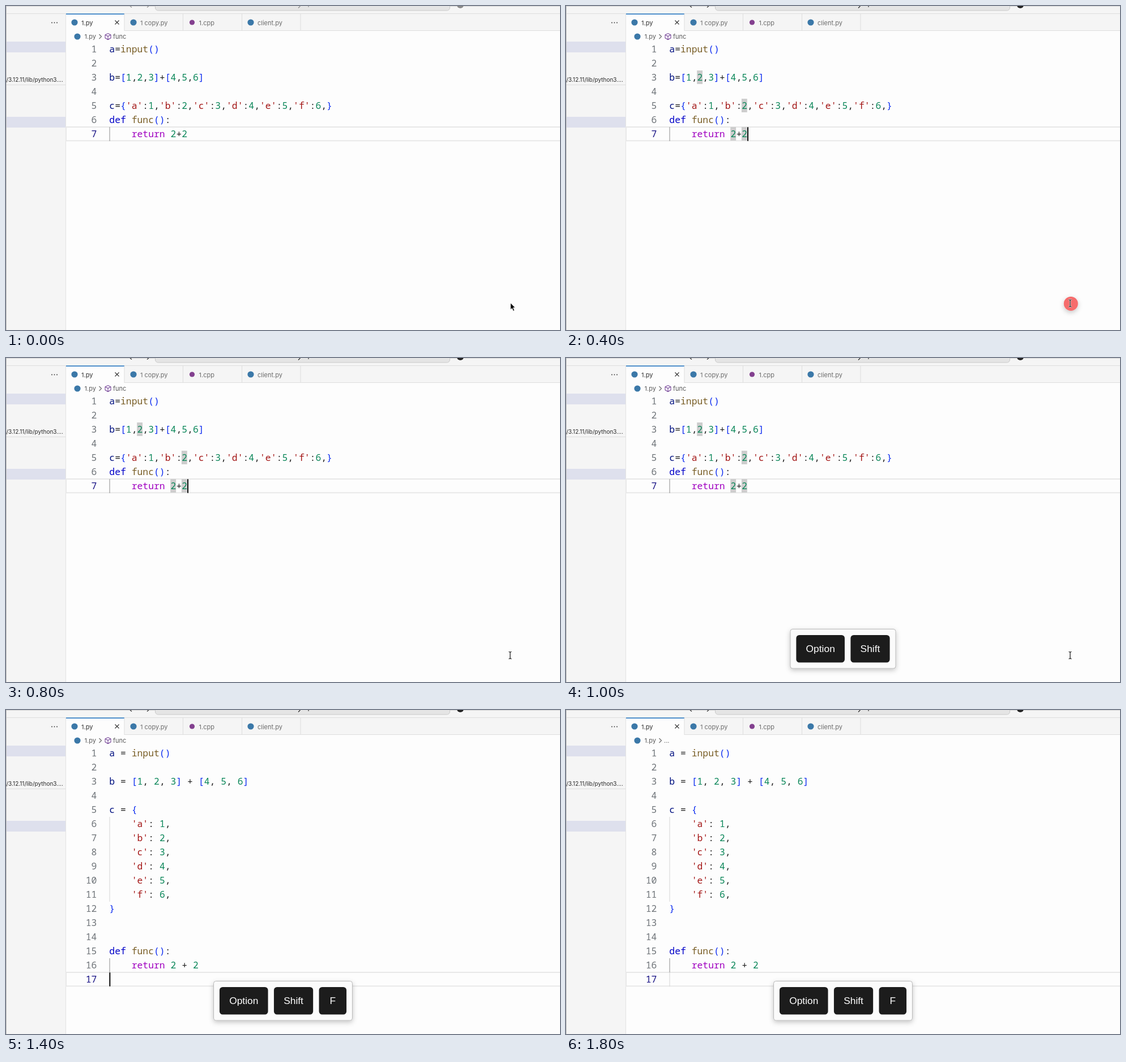
Animation, 978 px wide and 573 px high, one loop 2 s. Source, as an HTML page:

```html
<!DOCTYPE html>
<html lang="en">
<head>
<meta charset="utf-8">
<title>Formatting a file</title>
<style>
html, body { margin: 0; width: 100%; height: 100%; overflow: hidden; background: #fdfdfd; }
svg { display: block; width: 100%; height: 100%; }
text { white-space: pre; }
.ui { font-family: Inter, "Open Sans", sans-serif; font-size: 11px; }
.key { font-family: "Liberation Sans", Arial, sans-serif; font-size: 17.4px; fill: #fff; text-anchor: middle; }
.code { font-family: "Noto Sans Mono", "DejaVu Sans Mono", monospace; font-size: 16.4px; font-variant-ligatures: none; }
</style>
</head>
<body>
<svg viewBox="0 0 978 573" xmlns="http://www.w3.org/2000/svg">
  <defs>
    <filter id="soft" x="-30%" y="-30%" width="160%" height="180%">
      <feDropShadow dx="0" dy="3" stdDeviation="4" flood-color="#000" flood-opacity=".22"/>
    </filter>
  </defs>
  <g id="frame"></g>
  <g id="chrome"></g>
  <g id="crumb"></g>
  <g id="editor"></g>
  <g id="keys"></g>
  <g id="pointer"></g>
</svg>
<script>
const $ = id => document.getElementById(id);
const STEP = 200, LOOP = 2000;
const X0 = 182.3, CW = 9.84, TOP = 64, ROW = 25;

const rect = (x, y, w, h, fill, extra = '') =>
  `<rect x="${x}" y="${y}" width="${w}" height="${h}" fill="${fill}" ${extra}/>`;
const dot = (x, y, r, fill, extra = '') =>
  `<circle cx="${x}" cy="${y}" r="${r}" fill="${fill}" ${extra}/>`;
const path = (d, stroke, w = 1, fill = 'none') =>
  `<path d="${d}" fill="${fill}" stroke="${stroke}" stroke-width="${w}"/>`;
const label = (x, y, s, fill, extra = '') =>
  `<text class="ui" x="${x}" y="${y}" fill="${fill}" ${extra}>${s}</text>`;
const rowTop = n => TOP + ROW * (n - 1);
const colX = c => X0 + CW * c;

const before = [
  'a=input()', '', 'b=[1,2,3]+[4,5,6]', '',
  "c={'a':1,'b':2,'c':3,'d':4,'e':5,'f':6,}",
  'def func():', '    return 2+2'
];
const after = [
  'a = input()', '', 'b = [1, 2, 3] + [4, 5, 6]', '', 'c = {',
  ...[...'abcdef'].map((k, i) => `    '${k}': ${i + 1},`),
  '}', '', '', 'def func():', '    return 2 + 2', ''
];

const rules = [
  [/^'\w'$/, '#a31515'], [/^def$/, '#0000c8'], [/^return$/, '#a000c0'],
  [/^(input|func)$/, '#795e26'], [/^\d$/, '#098658'],
  [/^[a-c]$/, '#001080'], [/^[()[\]{}]$/, '#0c2cf0']
];
const INK = '#1f1f1f';
const paint = s => (rules.find(([re]) => re.test(s)) || [0, INK])[1];
const tokens = s => s.match(/'\w'|[a-z]+|./g) || [];

function codeLine(s, n, active, plain) {
  const y = rowTop(n) + 17.6;
  const spans = tokens(s).map(k => `<tspan fill="${plain ? INK : paint(k)}">${k}</tspan>`).join('');
  const attrs = `class="code" y="${y}"`;
  return `<text ${attrs} x="160.3" text-anchor="end" fill="${active ? '#171184' : '#6e7378'}">${n}</text>` +
    `<text ${attrs} x="${X0}">${spans}</text>`;
}

const guide = (n, rows, fill) => rect(182.5, rowTop(n), 1, ROW * rows, fill);

function editor(t) {
  const done = t >= 1200;
  const lines = done ? after : before;
  const last = lines.length, y = rowTop(last);
  let s = rect(106, y, 880, ROW - .7, 'none', 'stroke="#e8e8e8" stroke-width="2"');
  if (done) {
    s += guide(6, 6, '#d6d6d6') + guide(16, 1, '#8e8e8e') + guide(17, 1, '#d6d6d6');
  } else {
    s += guide(7, 1, '#8e8e8e');
    if (t >= 400)
      for (const [n, c] of [[3, 5], [5, 13], [7, 11], [7, 13]])
        s += rect(colX(c) - .3, rowTop(n), CW, 24, '#cdcdcd');
  }
  lines.forEach((line, i) => {
    s += codeLine(line, i + 1, i + 1 === last, t === 1200 && i > 4 && i < 11);
  });
  const caret = (t >= 400 && t < 1000) || (t >= 1200 && t < 1800);
  if (caret) s += rect(done ? 182.4 : 320.1, y + .3, 1.9, 24.4, '#000');
  return s;
}

function frame() {
  const line = '#dedede';
  let s = rect(0, 0, 978, 573, '#fdfdfd') + rect(0, 0, 105, 573, '#f5f5f5') +
    rect(0, 0, 978, 13, '#f5f5f5') + rect(209, 13, 769, 31, '#f5f5f5') +
    rect(0, 0, 978, 1, '#d4d4d4') + rect(0, 13, 978, 1, line);
  s += rect(263.5, -12, 520, 20, '#e5e5e5', 'rx="5" stroke="#c9c9c9"');
  s += rect(0, 63, 105, 19, '#dee0ed') + rect(0, 196, 105, 19, '#dee0ed');
  s += rect(0, 139, 105, 1, line) + rect(105, 13, 1, 560, '#e3e3e3') + rect(0, 0, 1, 573, '#bdbdbd');
  s += rect(209, 43, 769, 1, line) + rect(106, 13.5, 103, 1.5, '#1f75c4');
  for (const x of [208.5, 312, 416, 519.5]) s += rect(x, 14, 1, 30, line);
  for (const x of [81, 85.5, 90]) s += dot(x, 29.5, 1, '#444');
  s += label(.5, 134, '/3.12.11/lib/python3....', '#2b2b2b', 'style="font-size:10px"');
  for (const [x, y] of [[121, 29], [225, 29], [432, 29], [126, 54]]) s += dot(x, y, 5.6, '#3b78a8');
  s += dot(328.5, 29, 4.6, '#83408f');
  s += label(133, 33.5, '1.py', '#2f2f2f') + label(237, 33.5, '1 copy.py', '#6c6c6c') +
    label(340.5, 33.5, '1.cpp', '#6c6c6c') + label(444, 33.5, 'client.py', '#6c6c6c');
  s += path('M192.5 25.5l7 7m0-7l-7 7', '#333', 1.1);
  s += label(138.5, 58, '1.py', '#5a5a5a') + path('M164.5 50l4 4l-4 4', '#666', 1.1);
  return s;
}

function chrome(t) {
  const c = t < 400 ? '#8a8a8a' : '#222';
  return path('M219 0l3 2.6M249 2.6l3-2.6M516 3.5l3.5-3.5M534 0v2', c, 1.1) + dot(802, -2, 6, c);
}

function crumb(t) {
  if (t >= 1600) return label(173, 58, '...', '#5a5a5a');
  return path('M180 48.5l5 2.5v5.6l-5 2.9l-5-2.9v-5.6zM175 51l5 2.6l5-2.6M180 53.6v5.9', '#7a4b9c', 1.1) +
    label(189, 58, 'func', '#5a5a5a');
}

function keys(t) {
  if (t < 1000) return '';
  const caps = [['Option', 85.6], ['Shift', 69.2], ['F', 48.5]].slice(0, t < 1200 ? 2 : 3);
  const gap = 10.4;
  const w = caps.reduce((sum, k) => sum + k[1] + gap, gap);
  let x = 489 - w / 2;
  let s = rect(x, 479.5, w, 69.5, '#fbfbfb', 'rx="4" stroke="#b8b8b8" filter="url(#soft)"');
  for (const [name, kw] of caps) {
    x += gap;
    s += rect(x, 490, kw, 48.5, '#1c1c1c', 'rx="5.5"') +
      `<text class="key" x="${x + kw / 2}" y="520.3">${name}</text>`;
    x += kw;
  }
  return s;
}

function pointer(t) {
  if (t >= 1200) return '';
  if (t < 400)
    return path('M890.5 525v12.2l2.8-2.6l2.1 4.8l2.2-1l-2.1-4.7h3.7z', '#fff', .9, '#000');
  let s = '';
  if (t === 400) s += dot(891.3, 526.4, 12.5, '#f66c6c', 'filter="url(#soft)"');
  if (t === 600) s += dot(891.3, 526.4, 16, '#f66c6c', 'opacity=".35" filter="url(#soft)"');
  const beam = 'M887.5 519.5q2.5 0 2.5 1.5q0-1.5 2.5-1.5M890 520.5v10.5M887.5 532q2.5 0 2.5-1.5q0 1.5 2.5 1.5';
  return s + path(beam, '#fff', 2.4) + path(beam, '#111', 1.2);
}

const layers = { chrome, crumb, editor, keys, pointer };
let shown = -1;

function draw(now) {
  const t = Math.floor(now % LOOP / STEP) * STEP;
  if (t !== shown) {
    shown = t;
    for (const id in layers) $(id).innerHTML = layers[id](t);
  }
}

$('frame').innerHTML = frame();
draw(0);
let start;
function tick(now) {
  start ??= now;
  draw(now - start);
  requestAnimationFrame(tick);
}
requestAnimationFrame(tick);
</script>
</body>
</html>
```
